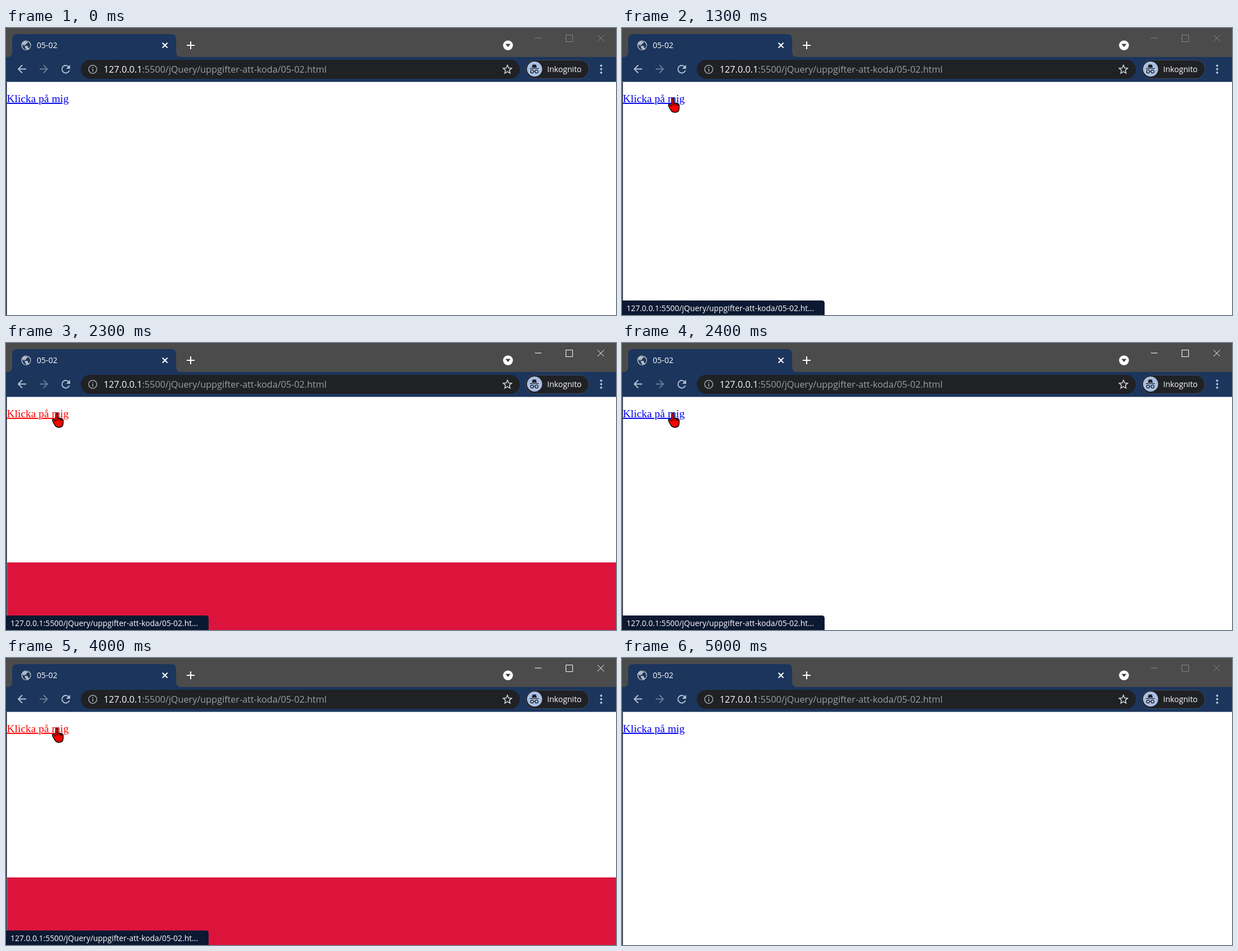
Write an HTML page that moves like this. It is 1090 by 514 pixels and loops after 5.1 s.

```html
<!DOCTYPE html>
<html lang="sv">
<head>
<meta charset="utf-8">
<title>05-02</title>
<style>
  html, body { margin: 0; width: 100%; height: 100%; overflow: hidden; background: #fff; }
  svg { display: block; width: 100%; height: 100%; }
  text { font-family: "Open Sans", "Noto Sans", sans-serif; font-size: 14.1px; fill: #fff; }
  .url { font-size: 16.25px; fill: #9aa0a6; }
  .line { fill: none; stroke: #fff; stroke-width: 2; }
  .tool { fill: none; stroke: #bac5d6; stroke-width: 1.8; }
  #link {
    font: 19.5px "Liberation Serif", "Times New Roman", serif;
    text-decoration: underline; text-decoration-thickness: 1px; text-underline-offset: 1px;
  }
  #controls { fill: none; stroke-width: 1; }
  #arrow, #hand { fill: #f00; stroke: #000; stroke-width: 1.5; stroke-linejoin: round; }
</style>
</head>
<body>
<svg viewBox="0 0 1090 514">
  <!-- Title bar and tab -->
  <rect width="1090" height="52" fill="#4b4b4b"/>
  <path d="M2 52Q11 52 11 43V20Q11 11 20 11H295Q304 11 304 20V43Q304 52 313 52H1090V97H0V52Z" fill="#1b355d"/>
  <circle cx="36" cy="31" r="8.7" fill="#b4b9c0"/>
  <path d="M29 29l5 4v3l2 1v2q-7-1-7-10zM34 24l5-1v3l-3 2v2h-3v2h6v3l3 1q3-6-1-10l-3-2z" fill="#1b355d"/>
  <text x="55" y="36">05-02</text>
  <path class="line" d="M279.5 26.5l9 9m0-9l-9 9M323 31h14m-7-7v14"/>
  <circle cx="897" cy="31" r="8.8" fill="#fff"/>
  <path d="M892.5 28.5h9l-4.5 5.5z" fill="#3c3c3c"/>
  <g id="controls">
    <path d="M945 18h12M1000.5 12.500h12v12h-12zM1057 12.5l11.5 11.5m0-11.5L1057 24"/>
  </g>

  <!-- Toolbar -->
  <path class="tool" d="M36 73.5H22m7-7l-7 7 7 7"/>
  <path class="tool" d="M60 73.5h14m-7-7l7 7-7 7" style="stroke:#6b7b95"/>
  <path class="tool" d="M112.5 70A6.8 6.8 0 1 0 113.3 76"/>
  <path d="M114.5 66v7h-7z" fill="#bac5d6"/>
  <rect x="133.5" y="57" width="784.5" height="34" rx="17" fill="#202124"/>
  <circle class="line" cx="155" cy="74" r="7.3" style="stroke:#9aa0a6;stroke-width:1.6"/>
  <path d="M154.1 70h1.8v1.8h-1.8zM154.1 73.3h1.8v4.7h-1.8z" fill="#9aa0a6"/>
  <text class="url" x="174.5" y="80"><tspan fill="#fff">127.0.0.1</tspan>:5500/jQuery/uppgifter-att-koda/05-02.html</text>
  <path class="line" d="M896 66.5l2.2 5 5.4.5-4.1 3.6 1.2 5.4-4.7-2.8-4.7 2.8 1.2-5.4-4.1-3.6 5.4-.5z" style="stroke:#d5d7da;stroke-width:1.5"/>
  <rect x="928.5" y="57.5" width="113" height="33" rx="16.5" fill="#202124" stroke="#3b4a64"/>
  <circle cx="944.5" cy="73.5" r="13.5" fill="#a9bfe5"/>
  <g fill="#202124">
    <path d="M936 72h16v1.3h-16zM939.5 71l1.500-5.500h6l1.500 5.500z"/>
    <path d="M942.5 77.5h3" stroke="#202124"/>
    <g fill="none" stroke="#202124" stroke-width="1.3"><circle cx="940" cy="78" r="2.7"/><circle cx="948" cy="78" r="2.7"/></g>
  </g>
  <text x="967" y="79">Inkognito</text>
  <g fill="#bac5d6"><circle cx="1063.5" cy="67.5" r="1.9"/><circle cx="1063.5" cy="73.7" r="1.9"/><circle cx="1063.5" cy="80" r="1.9"/></g>

  <!-- Page -->
  <rect y="96.5" width="1090" height="417.5" fill="#fff"/>
  <rect id="panel" x="2" y="393" width="1088" height="121" fill="#dc143c"/>
  <text id="link" x="1.5" y="133">Klicka på mig</text>
  <rect y="96.5" width="1.5" height="417.5" fill="#101c32"/>
  <g id="status">
    <path d="M0 488H357Q362 488 362 493V514H0Z" fill="#0b1932"/>
    <text x="8" y="507" style="font-size:13.9px">127.0.0.1:5500/jQuery/uppgifter-att-koda/05-02.ht...</text>
  </g>
  <path id="arrow" d="M1 1V22l5-4.5 3.5 8 4-1.7-3.5-8h7z"/>
  <path id="hand" transform="translate(82 124.5)" d="M7 16V2.500a1.800 1.800 0 0 1 3.600 0V10q3-1 4 1q2-1 3 1q2.500 0 2.500 2v5q0 7.500-7 7.500q-5 0-7-3Q3 19 1 14.500Q1 11.500 3 11.500Q5 12.500 7 16ZM10.600 10v4M14.600 11v3.500M17.600 12v3"/>
</svg>
<script>
  const LOOP = 5100, STEP = 100;
  const part = id => document.getElementById(id);
  const [controls, panel, link, status, arrow, hand] =
    ["controls", "panel", "link", "status", "arrow", "hand"].map(part);
  const clamp = v => Math.max(0, Math.min(1, v));
  const within = (t, from, to) => t >= from && t < to;
  const show = (el, on) => el.setAttribute("visibility", on ? "visible" : "hidden");

  function placeArrow(p) {
    const x = 110 + 936 * p, y = 122 - 22 * p;
    arrow.setAttribute("transform", `translate(${x} ${y})`);
  }

  function render(time) {
    const t = Math.floor((time % LOOP) / STEP) * STEP;
    const arriving = within(t, 100, 700), leaving = within(t, 4300, 4800);
    const active = within(t, 1400, 5000);
    const pressed = [2300, 3100, 4000].includes(t);

    show(arrow, arriving || leaving);
    if (arriving) placeArrow((1 - (t - 100) / 500) ** 2);
    if (leaving) placeArrow(((t - 4300) / 400) ** 2);
    show(hand, within(t, 700, 4300));
    show(panel, within(t, 1400, 2400) || within(t, 3200, 4100));
    link.style.fill = pressed ? "#f00" : "#00e";
    controls.style.stroke = active ? "#fff" : "#868686";
    status.style.opacity = Math.min(clamp((t - 700) / 300), clamp((4800 - t) / 400));
  }

  const start = performance.now();
  function tick() {
    render(performance.now() - start);
    requestAnimationFrame(tick);
  }
  tick();
</script>
</body>
</html>
```
